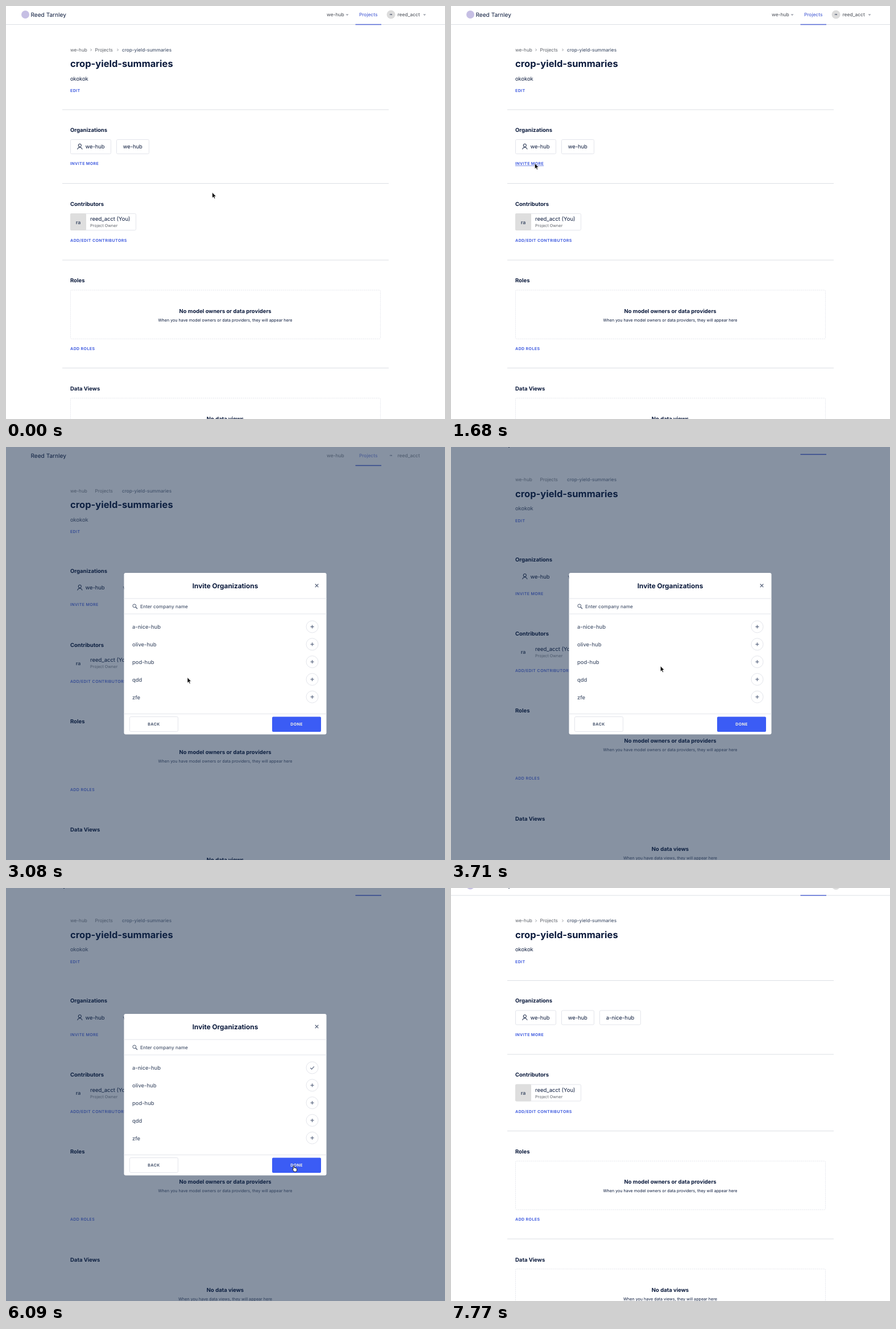
Animation, 772 px wide and 725 px high, one loop 8120 ms. Source, as an HTML page:

```html
<!DOCTYPE html>
<html lang="en">
<head>
<meta charset="utf-8">
<title>Invite organizations</title>
<style>
  html, body { margin: 0; width: 100%; height: 100%; overflow: hidden; background: #fff; }
  svg { display: block; width: 100vw; height: 100vh; }
  text { font-family: Inter, "Open Sans", sans-serif; fill: #0b1a3c; white-space: pre; text-rendering: geometricPrecision; }
  .bold { font-weight: 700; }
  .semi { font-weight: 600; }
  .medium { font-weight: 500; }
  .link, .caps { font-weight: 700; letter-spacing: .4px; }
  .link { fill: #4560e0; }
  .gray { fill: #5c6068; }
  .slate { fill: #4b5870; }
  .blue { fill: #5468d8; }
  .mid { text-anchor: middle; }
  .line { fill: none; stroke: #e3e5eb; }
  .rule { stroke: #dcdfe4; }
  .dash { stroke-dasharray: 2 1.5; }
  .icon { fill: none; stroke: #0b1a3c; }
  .dim .decor { display: none; }
  .dim .nav { opacity: .65; }
  .dim .link { font-weight: 500; }
  .dim .thin { opacity: .75; }
  .hover { text-decoration: underline; }
</style>
</head>
<body>
<svg id="stage" viewBox="0 0 772 725" preserveAspectRatio="none"></svg>
<script>
const LOOP = 8120, STEP = 70;
const SCROLL = 19.5;
const OPEN = 1750, CLOSE = 6160, PICK = 4970, PICKED = 5250;

// Text is placed by the vertical centre of its capitals.
const text = (x, cy, size, str, cls = '', id = '') =>
  `<text x="${x}" y="${cy + size * .36}" font-size="${size}" class="${cls}" id="${id}">${str}</text>`;
const box = (x, y, w, h, cls = 'line', r = 2) =>
  `<rect x="${x}" y="${y}" width="${w}" height="${h}" rx="${r}" class="${cls}"/>`;
const path = (d, attrs = 'class="icon"') => `<path d="${d}" ${attrs}/>`;
const rule = (x1, x2, y) => path(`M${x1} ${y}H${x2}`, 'class="rule decor"');
const caret = x => path(`M${x - 2.5} 14.2h5l-2.5 3z`, 'fill="#a3a7b0" class="decor"');
const chevron = x => path(`M${x - 1} 75l2 2-2 2`, 'class="decor" fill="none" stroke="#83878f" stroke-width=".9"');
const heading = (y, str) => text(113, y, 9.5, str, 'bold');
const link = (y, str, id) => text(113, y, 7, str, 'link', id);
const emptyBox = (y, what) =>
  box(113.5, y, 545, 85.5, 'line dash decor') +
  text(385.5, y + 36.5, 9.5, `No ${what}`, 'bold mid') +
  text(385.5, y + 52.5, 7.15, `When you have ${what}, they will appear here`, 'mid thin');

const header = `
  <circle cx="34" cy="15" r="7" fill="#c6bfe4" class="decor"/>
  ${text(43.5, 15, 10.1, 'Reed Tarnley')}
  ${rule(0, 772, 32.5)}
  <g class="nav">
    ${text(564, 15, 8.3, 'we-hub', 'gray medium')}${caret(600)}
    ${text(621, 15, 8.3, 'Projects', 'blue medium')}
    <circle cx="677" cy="15" r="7.5" fill="#dcdcdc" class="decor"/>
    ${text(677, 15, 4, 'ra', 'semi mid')}
    ${text(688.5, 15, 8.4, 'reed_acct', 'gray medium')}${caret(736)}
  </g>
  ${path('M614.5 32.5h45.5', 'stroke="#5468d4" stroke-width="1.5"')}`;

const summary = `
  <g class="thin">
    ${text(113, 77, 8.2, 'we-hub', 'gray')}${chevron(149.5)}
    ${text(156.5, 77, 8.2, 'Projects', 'gray')}${chevron(196.5)}
    ${text(204, 77, 8.2, 'crop-yield-summaries', 'medium slate')}
  </g>
  ${text(113, 101.5, 16.5, 'crop-yield-summaries', 'bold')}
  ${text(113, 127.5, 9.3, 'okokok', 'thin')}
  ${link(148.5, 'EDIT')}
  ${rule(99, 673, 182)}`;

const organizations = `
  ${heading(217.5, 'Organizations')}
  ${box(113.5, 234.5, 71, 25, 'line decor')}
  <circle cx="129.8" cy="244.7" r="2.6" class="icon"/>
  ${path('M125.6 251.6q.6-3.6 4.2-3.6t4.2 3.6')}
  ${text(139.5, 247, 9.4, 'we-hub')}
  ${box(194.5, 234.5, 57, 25, 'line decor')}
  ${text(222.8, 247, 9.4, 'we-hub', 'mid')}
  <g id="newChip">
    ${box(261.5, 234.5, 72, 25)}
    ${text(297.5, 247, 9.4, 'a-nice-hub', 'mid')}
  </g>
  ${link(276.5, 'INVITE MORE', 'invite')}
  ${rule(99, 673, 311.5)}`;

const contributors = `
  ${heading(347.5, 'Contributors')}
  <g class="decor">
    ${box(113.5, 364.5, 115, 29)}
    <rect x="113" y="364" width="28" height="30" rx="2" fill="#dedede"/>
  </g>
  ${text(127, 379.5, 8.8, 'ra', 'bold mid slate')}
  ${text(148, 374, 9.5, 'reed_acct (You)')}
  ${text(148, 385.5, 7.15, 'Project Owner', 'gray thin')}
  ${link(411.5, 'ADD/EDIT CONTRIBUTORS')}
  ${rule(99, 673, 446)}`;

const lower = `
  ${heading(482, 'Roles')}
  ${emptyBox(498.8, 'model owners or data providers')}
  ${link(601, 'ADD ROLES')}
  ${rule(99, 673, 635.5)}
  ${heading(672, 'Data Views')}
  ${emptyBox(688.3, 'data views')}`;

const row = (name, i) => {
  const y = 315.5 + i * 30.8;
  const plus = path(`M535.5 ${y}h6m-3-3v6`, 'stroke="#66728a" stroke-width="1.3"');
  return text(222, y + .5, 9.4, name, 'medium slate') + (i ? '' : '<g id="idle">') +
    `<circle cx="538.5" cy="${y}" r="10.5" class="line"/>${plus}` + (i ? '' : '</g>');
};

const modal = `
  <rect x="207.5" y="221" width="356" height="283.5" rx="3" fill="#fff"/>
  ${text(385.5, 243.3, 11.8, 'Invite Organizations', 'bold mid')}
  ${path('M543.7 240.5l5.6 5.6m0-5.6l-5.6 5.6', 'stroke="#55617a" stroke-width="1.2"')}
  ${path('M207.5 266h356m-356 27h356m-356 175.5h356', 'class="line"')}
  <circle cx="225.8" cy="278.8" r="2.9" class="icon" style="stroke:#4b5870"/>
  ${path('M228 281l3 3', 'stroke="#4b5870" stroke-width="1.3"')}
  ${text(236, 280, 8.3, 'Enter company name', 'medium slate')}
  ${['a-nice-hub', 'olive-hub', 'pod-hub', 'qdd', 'zfe'].map(row).join('')}
  <g id="busy">
    <circle cx="538.5" cy="315.5" r="10.5" fill="#d9dcdd"/>
    ${path('M535 315.5h7.5', 'stroke="#55617a" stroke-width="1.6" stroke-dasharray="1.6 1.3"')}
  </g>
  <g id="checked">
    <circle cx="538.5" cy="315.5" r="10.5" class="line"/>
    ${path('M535.3 315.7l2.3 2.3 4.2-4.6', 'fill="none" stroke="#66728a" stroke-width="1.3"')}
  </g>
  ${box(217.5, 473.5, 85, 26)}
  ${text(260, 486.5, 7, 'BACK', 'caps mid slate')}
  <rect x="468" y="473.5" width="86" height="26.5" rx="2" fill="#3b5cf5"/>
  ${text(511, 486.5, 7, 'DONE', 'caps mid" style="fill:#f3f2e4')}`;

const cursors = `
  <g id="cursor">
    <path id="arrow" d="M0 0V9.6L2.2 7.6 3.7 11 5.3 10.3 3.8 7H6.8Z" stroke="#fff" stroke-width=".7"/>
    <path id="hand" d="M1.6 1Q2.6 0 3.4 1V4.2Q4.4 3.6 5 4.6 6 4 6.5 5 7.8 4.6 8 5.8V8.2Q7.8 9.6 7 11H3Q2 9 0 7 0 5.8 1.6 6.6Z"
      fill="#fff" stroke="#111" stroke-width=".9" stroke-linejoin="round"/>
  </g>`;

const $ = id => document.getElementById(id);
$('stage').innerHTML = `
  <g id="page">${header + summary + organizations + contributors + lower}</g>
  <g id="dialog"><rect width="772" height="725" fill="#112747" opacity=".5"/>${modal}</g>
  ${cursors}`;

// Cursor stops: time, x, y.
const stops = [
  [0, 362.7, 327.3], [1260, 147.3, 276.3], [2100, 147.3, 276.3], [3080, 319, 404.6],
  [3430, 319, 404.6], [4340, 537.5, 316], [5180, 537.5, 316], [5880, 503.5, 487],
  [6160, 503.5, 487], [6650, 570, 740], [LOOP, 570, 740]
];
const ease = (t, from, to) => {
  const p = Math.min(1, Math.max(0, (t - from) / (to - from)));
  return p * p * (3 - 2 * p);
};
const cursorAt = t => {
  const i = stops.findIndex(s => s[0] > t);
  const [t0, x0, y0] = stops[i - 1], [t1, x1, y1] = stops[i];
  const p = ease(t, t0, t1);
  return [x0 + (x1 - x0) * p, y0 + (y1 - y0) * p];
};
const show = (id, on) => { $(id).style.display = on ? '' : 'none'; };

function draw(now) {
  const t = Math.floor(now % LOOP / STEP) * STEP;
  const open = t >= OPEN && t < CLOSE;
  const [x, y] = cursorAt(t);
  const overPick = open && Math.hypot(x + 1 - 538.5, y - 315.5) < 10.5;
  const overDone = open && x > 468 && x < 554 && y > 473 && y < 500;
  const hand = overPick || overDone;

  $('page').setAttribute('transform', `translate(0 ${-SCROLL * ease(t, 3150, 3500)})`);
  $('page').setAttribute('class', open ? 'dim' : '');
  $('invite').classList.toggle('hover', t >= 1120 && t < OPEN);
  show('newChip', t >= CLOSE);
  show('dialog', open);
  show('idle', t < PICK);
  show('busy', t >= PICK && t < PICKED);
  show('checked', t >= PICKED);
  $('cursor').setAttribute('transform', `translate(${x} ${y})`);
  show('arrow', !hand);
  show('hand', hand);
}

const start = performance.now();
function tick() {
  draw(performance.now() - start);
  requestAnimationFrame(tick);
}
tick();
</script>
</body>
</html>
```
